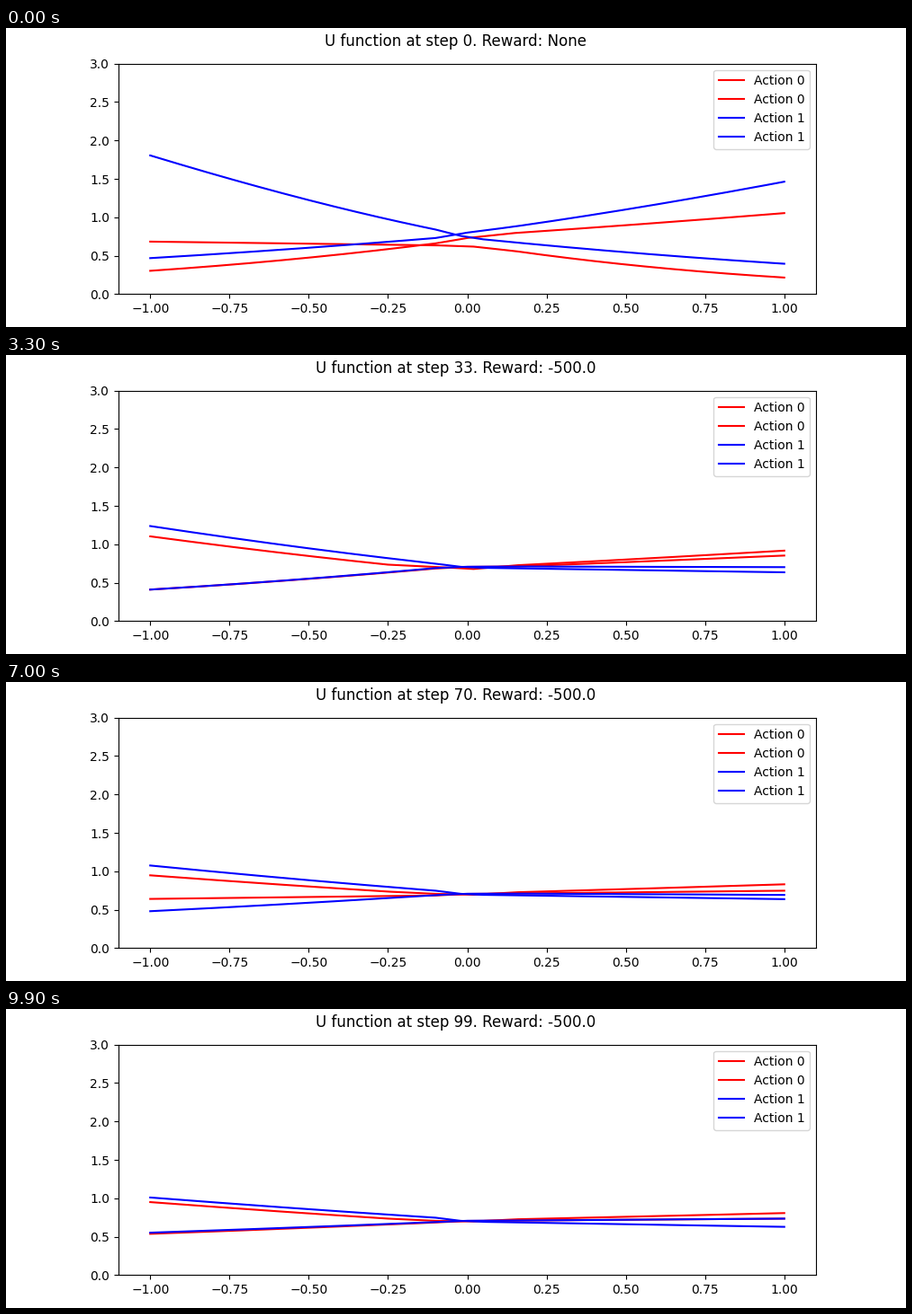
A matplotlib script that plays this animation: 1000x333 px, repeating every 10 s.

```python
import numpy as np
import matplotlib.pyplot as plt
from matplotlib.animation import FuncAnimation

STEPS = 100
KEYS = [0, 18, 33, 54, 70, 99]
FAST, SLOW = 6, 25  # steps a bend needs to settle


def softplus(u):
    return np.log1p(np.exp(u))


def inv_softplus(v):
    return np.log(np.expm1(v))


class Curve:
    """Softplus of a bent line: the ends drift between keys, the bends settle."""

    def __init__(self, color, label, left, right, bends):
        self.left, self.right = left, right
        self.x, self.start, self.rest, self.life = np.array(bends).T
        self.line, = ax.plot(xs, 0 * xs, color=color, label=label)

    def update(self, step):
        fade = np.exp(-step / self.life)
        middle = self.rest + (self.start - self.rest) * fade
        heights = [drift(self.left, step), *middle, drift(self.right, step)]
        u = np.interp(xs, [-1, *self.x, 1], inv_softplus(np.array(heights)))
        self.line.set_ydata(softplus(u))


def drift(values, step):
    """Ease out from each key value to the next."""
    k = min(np.searchsorted(KEYS, step, side="right"), len(KEYS) - 1) - 1
    t = (step - KEYS[k]) / (KEYS[k + 1] - KEYS[k])
    return values[k + 1] + (values[k] - values[k + 1]) * (1 - t) ** 1.6


xs = np.linspace(-1, 1, 201)
fig, ax = plt.subplots(figsize=(10, 3.33), dpi=100)
# Lay out as for a 3:10 page of 333 1/3 px, cut to whole pixels
page = (1000 / 3) / 333
fig.subplots_adjust(bottom=0.11 * page, top=0.88 * page)
title = fig.suptitle("", y=0.98 * page)
ax.set_xlim(-1.1, 1.1)
ax.set_ylim(0, 3)

# Each bend: position, first height, settled height, settling time
curves = [
    Curve("red", "Action 0",
          left=[0.303, 0.366, 0.41, 0.58, 0.64, 0.537],
          right=[1.054, 0.735, 0.853, 0.775, 0.747, 0.735],
          bends=[(-0.1, 0.66, 0.685, FAST), (0, 0.73, 0.705, FAST),
                 (0.15, 0.795, 0.71, FAST)]),
    Curve("red", "Action 0",
          left=[0.683, 1.12, 1.103, 0.97, 0.947, 0.95],
          right=[0.215, 0.955, 0.917, 0.9, 0.83, 0.807],
          bends=[(-0.25, 0.642, 0.735, FAST), (-0.1, 0.635, 0.706, FAST),
                 (0.02, 0.618, 0.7, SLOW), (0.15, 0.56, 0.726, FAST)]),
    Curve("blue", "Action 1",
          left=[1.805, 0.975, 1.237, 1.295, 1.075, 1.01],
          right=[0.395, 0.502, 0.635, 0.615, 0.637, 0.628],
          bends=[(-0.1, 0.84, 0.747, FAST), (-0.02, 0.757, 0.706, FAST),
                 (0.05, 0.713, 0.693, FAST)]),
    Curve("blue", "Action 1",
          left=[0.468, 0.366, 0.41, 0.5, 0.48, 0.552],
          right=[1.463, 0.652, 0.702, 0.692, 0.692, 0.735],
          bends=[(-0.1, 0.73, 0.69, FAST), (0, 0.8, 0.707, FAST),
                 (0.15, 0.88, 0.71, FAST)]),
]
ax.legend(loc="upper right")


def draw(step):
    for curve in curves:
        curve.update(step)
    reward = "-500.0" if step else "None"
    title.set_text(f"U function at step {step}. Reward: {reward}")
    return [title] + [curve.line for curve in curves]


anim = FuncAnimation(fig, draw, frames=STEPS, interval=100,
                     repeat=True, repeat_delay=0, blit=False)
plt.show()
```
